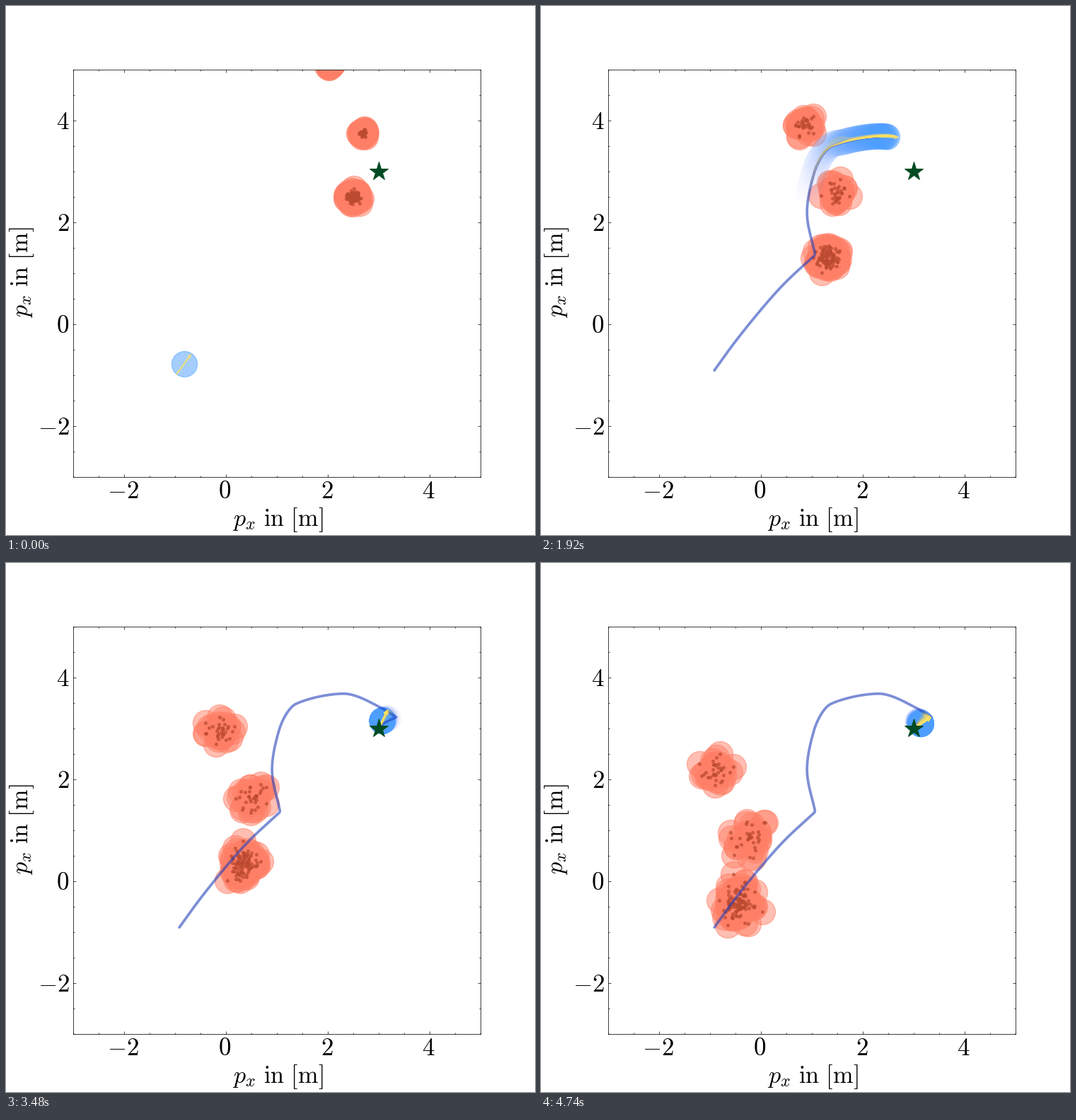
Animation of 748 by 748 pixels, one loop 4800 ms. Source, as a matplotlib script:

```python
import matplotlib.pyplot as plt
import numpy as np
from matplotlib.animation import FuncAnimation
from matplotlib.collections import PolyCollection
from matplotlib.ticker import MultipleLocator

plt.rcParams["mathtext.fontset"] = "cm"

SIZE, DPI = 748, 68
PX = 72 / DPI                      # points per pixel
FRAMES, INTERVAL = 80, 60
UNIT = 72                          # pixels per metre
RADIUS = 0.25                      # of robot and particles, in metres
SUB, TRAIL = 5, 56                 # robot steps per frame, steps kept visible
DRIFT, JITTER = 0.0374, 0.018      # particle motion in metres per frame

RED, BROWN = "#ff7f66", "#bb4a30"
YELLOW, NAVY, GREEN = (1.0, 0.88, 0.39), "#1e3cb9", "#004b23"
OLD_BLUE, NEW_BLUE = np.array([0.72, 0.70, 1.0]), np.array([0.30, 0.62, 1.0])

# Waypoints (frame, x, y) of the approach, the detour and the reverse onto the goal
GOAL = (3, 3)
LEGS = [
    [(0, -0.92, -0.91), (5, -0.49, -0.32), (11, 0.41, 0.75), (15.5, 1.06, 1.36)],
    [(15.5, 1.06, 1.36), (20, 0.90, 2.19), (24, 1.04, 2.97), (27, 1.37, 3.48),
     (32, 2.31, 3.68), (36, 2.99, 3.43), (40, 3.34, 3.22)],
    [(40, 3.34, 3.22), (48, 3.05, 3.07), (54, *GOAL), (79, *GOAL)],
]

# Particle clusters: x, y, count, initial spread
CLUSTERS = [(2.5, 2.5, 100, 0.055), (2.68, 3.75, 32, 0.033), (2.05, 5.1, 32, 0.033)]


def smooth(t, knots, values):
    """Monotone cubic interpolation."""
    h = np.diff(knots)
    d = np.diff(values) / h
    prod = d[:-1] * d[1:]
    mid = np.divide(2 * prod, d[:-1] + d[1:], out=np.zeros_like(prod), where=prod > 0)
    m = np.concatenate([d[:1], mid, d[-1:]])
    i = np.clip(np.searchsorted(knots, t, side="right") - 1, 0, len(h) - 1)
    u = (t - knots[i]) / h[i]
    return ((1 + 2 * u) * (1 - u) ** 2 * values[i] + u * u * (3 - 2 * u) * values[i + 1]
            + h[i] * u * (1 - u) * ((1 - u) * m[i] - u * m[i + 1]))


def ease(t, start, end):
    u = np.clip((t - start) / (end - start), 0, 1)
    return u * u * (3 - 2 * u)


def drive(t):
    """Position of the robot's rear axle along all legs."""
    pos = np.zeros((len(t), 2))
    for leg in map(np.array, LEGS):
        on = (t >= leg[0, 0]) & (t <= leg[-1, 0])
        for axis in (0, 1):
            pos[on, axis] = smooth(t[on], leg[:, 0], leg[:, axis + 1])
    return pos


def steer(t, pos):
    """Follow the path while driving forward, then swing round at the goal."""
    vx, vy = np.gradient(pos, axis=0).T
    swing = -28 + 93 * ease(t, 36, 53) - 33 * ease(t, 66, 79)
    angle = np.where(t < 37, np.arctan2(vy, vx), np.radians(swing))
    padded = np.pad(angle, SUB // 2, mode="edge")
    return np.convolve(padded, np.ones(SUB) / SUB, mode="valid")


def particle_tracks(rng, x, y, count, spread):
    """Random walks around a centre that drifts down and left."""
    steps = rng.normal(-DRIFT, JITTER, (FRAMES, count, 2))
    steps[0] = rng.normal((x, y), spread, (count, 2))
    return np.cumsum(steps, axis=0)


rng = np.random.default_rng(12)
particles = np.concatenate([particle_tracks(rng, *c) for c in CLUSTERS], axis=1)

times = np.arange((FRAMES - 1) * SUB + 1) / SUB
rear = drive(times)
angle = steer(times, rear)
ahead = np.column_stack([np.cos(angle), np.sin(angle)])
side = np.column_stack([-np.sin(angle), np.cos(angle)])
body = rear + 0.163 * ahead

half = np.array([(-0.265, 0.015), (0.15, 0.015), (0.15, 0.042), (0.245, 0)])
outline = np.vstack([half, half[-2::-1] * (1, -1)])
arrows = (body[:, None] + outline[None, :, :1] * ahead[:, None]
          + outline[None, :, 1:] * side[:, None])

fig = plt.figure(figsize=(SIZE / DPI, SIZE / DPI), dpi=DPI, facecolor="white")
ax = fig.add_subplot(aspect="equal", xlim=(-3, 5), ylim=(-3, 5))
for spine in ax.spines.values():
    spine.set_linewidth(0.75 * PX)
for axis in (ax.xaxis, ax.yaxis):
    axis.set_major_locator(MultipleLocator(2))
    axis.set_minor_locator(MultipleLocator(0.5))
ax.tick_params(which="both", direction="in", top=True, right=True, width=0.7 * PX,
               labelleft=False, labelbottom=False)
ax.tick_params(which="major", length=4 * PX)
ax.tick_params(which="minor", length=2 * PX)


def label(x, y, text, size, **kw):
    fig.text(x / SIZE, 1 - y / SIZE, text, fontsize=size * PX, va="baseline", **kw)


for v in range(-2, 5, 2):
    label(309.5 + UNIT * v, 695.5, f"${v}$", 35, ha="center")
    label(89.5, 461.5 - UNIT * v, f"${v}$", 35, ha="right")
TITLE = r"$p_x\ \mathrm{in}\ [\mathrm{m}]$"
label(384.5, 735, TITLE, 34.3, ha="center")
label(31, 377, TITLE, 34.3, ha="center", rotation=90, rotation_mode="anchor")


def discs(radius, color, alpha, line, z):
    return ax.scatter([], [], s=(2 * radius * UNIT * PX) ** 2, c=color, alpha=alpha,
                      edgecolors=color, linewidths=line * PX, zorder=z)


halos = discs(RADIUS, RED, 0.5, 1.4, 2)
dots = discs(0.028, BROWN, 0.65, 1, 3)
robot = discs(RADIUS, NEW_BLUE[None], None, 1.4, 4)
path, = ax.plot([], [], color=NAVY, alpha=0.58, lw=3.7 * PX, zorder=5,
                solid_capstyle="round", solid_joinstyle="round")
pointer = PolyCollection([], edgecolors="none", zorder=6)
ax.add_collection(pointer, autolim=False)
ax.plot(*GOAL, "*", color=GREEN, ms=28 * PX, mew=PX, zorder=7)


def update(n):
    halos.set_offsets(particles[n])
    dots.set_offsets(particles[n])

    last = n * SUB
    steps = np.arange(max(0, last - TRAIL + 1), last + 1)
    fresh = (1 - (last - steps) / TRAIL)[:, None]
    fade = 0.006 + 0.494 * fresh ** 2.5
    blue = np.hstack([OLD_BLUE + (NEW_BLUE - OLD_BLUE) * np.sqrt(fresh), fade])
    robot.set_offsets(body[steps])
    robot.set_facecolor(blue)
    robot.set_edgecolor(blue)

    pointer.set_verts(arrows[steps])
    pointer.set_facecolor(np.hstack([np.tile(YELLOW, (len(steps), 1)), 1.6 * fade]))
    path.set_data(*rear[:last + 1].T if n else ([], []))
    return halos, dots, robot, path, pointer


anim = FuncAnimation(fig, update, frames=FRAMES, interval=INTERVAL,
                     repeat=True, repeat_delay=0, blit=False)
plt.show()
```
